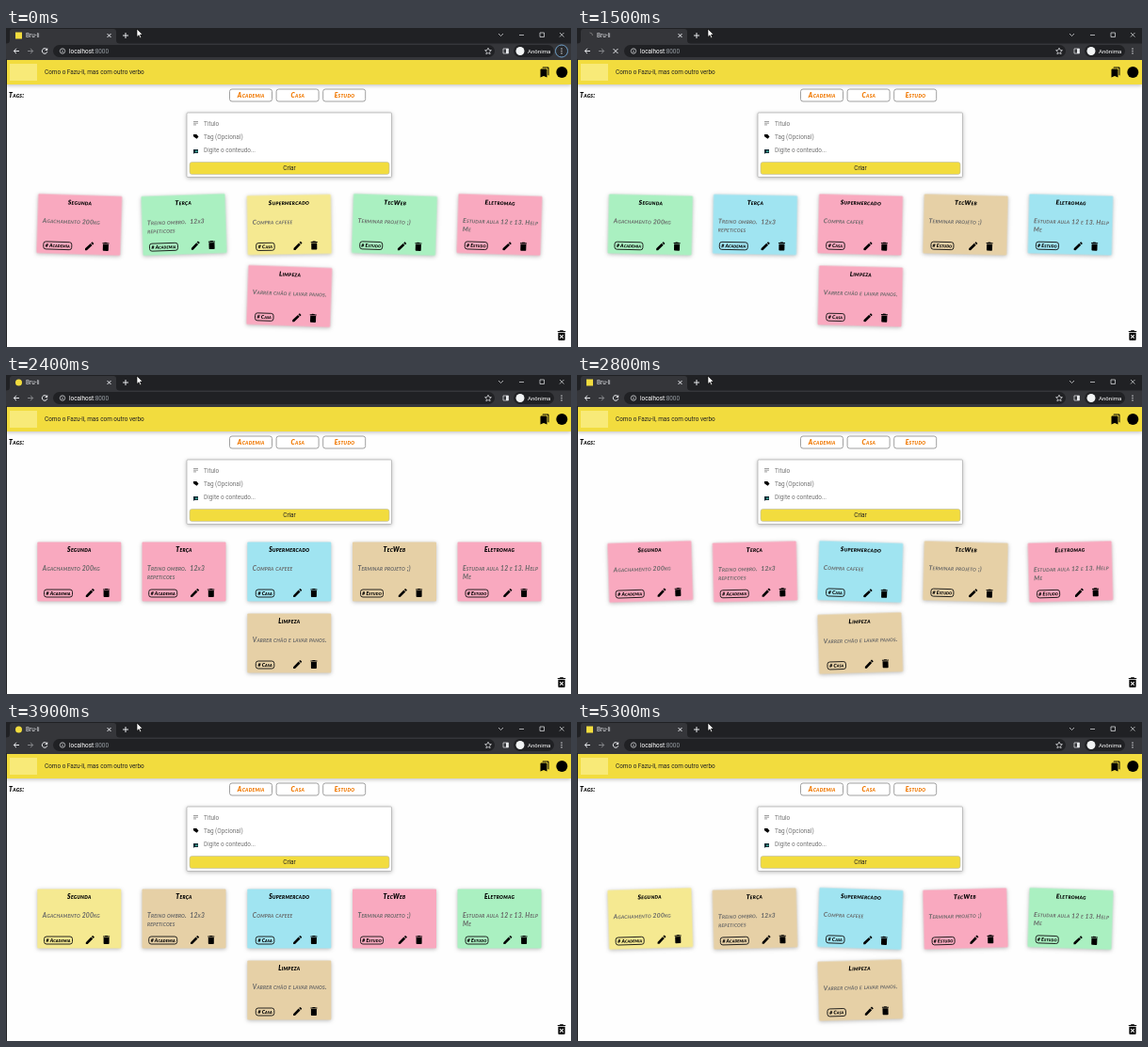
An HTML page that plays this animation: 600x339 px, repeating every 5.4 s.

```html
<!DOCTYPE html>
<html lang="pt">
<head>
<meta charset="utf-8">
<style>
  html, body { margin: 0; width: 100%; height: 100%; overflow: hidden; background: #fefefe; }
  svg { display: block; }
  text { font: 6.4px Roboto, sans-serif; white-space: pre; }
  .hand text, text.hand { font: italic 700 6.8px Lato, sans-serif; font-variant: small-caps; letter-spacing: .2px; }
  .hand text.bold, text.hand { font-weight: 900; letter-spacing: .3px; }
  .hand text.tag { font-size: 5.2px; font-weight: 900; letter-spacing: .1px; }
  .mid { text-anchor: middle; }
  .line { fill: none; stroke: #e8eaed; stroke-width: 1; }
  .soft { filter: drop-shadow(0 1px 2px #0004); }
</style>
</head>
<body>
<svg width="600" height="339" viewBox="0 0 600 339">
  <defs>
    <path id="pencil" d="M3 17.25V21h3.75L17.81 9.94l-3.75-3.75zM20.71 7.04a1 1 0 0 0 0-1.41l-2.34-2.34a1 1 0 0 0-1.41 0l-1.83 1.83 3.75 3.75z"/>
    <path id="bin" d="M6 19c0 1.1.9 2 2 2h8c1.1 0 2-.9 2-2V7H6zM19 4h-3.5l-1-1h-5l-1 1H5v2h14z"/>
  </defs>

  <!-- Header -->
  <rect class="soft" y="33" width="600" height="27" fill="#f2dc3e"/>
  <rect x="4" y="38" width="29" height="18" fill="#f8ea78"/>
  <text x="41" y="49" fill="#222">Como o Fazu-li, mas com outro verbo</text>
  <path transform="translate(566 41) scale(.5)" d="M19 18l2 1V3c0-1.1-.9-2-2-2H9C7.9 1 7 1.900 7 3h10c1.1 0 2 .9 2 2zM15 5H5c-1.1 0-2 .9-2 2v16l7-3 7 3V7c0-1.1-.9-2-2-2z"/>
  <circle cx="590.3" cy="47" r="6"/>

  <!-- Browser -->
  <rect width="600" height="17" fill="#202124"/>
  <path d="M0 16.5Q4 16.5 4 13V4Q4 1 7 1H114Q117 1 117 4V13Q117 16.5 121 16.5H600V34H0z" fill="#35363a"/>
  <rect y="33" width="1" height="306" fill="#202124"/>
  <rect id="icon" x="10" y="4.5" width="7" height="7" fill="#f2dc3e"/>
  <path id="spinner" class="line" d="M13.5 5A3 3 0 0 1 16.5 8" style="stroke:#777"/>
  <text x="21" y="10.300" fill="#dfe1e5">Bru-li</text>
  <path class="line" d="M107.5 6l4 4m0-4l-4 4M124 8h6m-3-3v6"/>
  <path class="line" d="M523 6l2.5 2.5L528 6M545 7.5h5M567 5h4.5v4.5H567zM588 5l4.5 4.5m0-4.5L588 9.5" style="stroke-width:.7"/>
  <path d="M139 1v8.5l2-1.8 1.5 3 1.3-.6-1.4-3h2.7z" fill="#fff" stroke="#000" stroke-width=".6"/>
  <rect x="50" y="18" width="469" height="13" rx="6.5" fill="#202124"/>
  <path class="line" d="M14 24.500H8.5m2.5-2.7L8.3 24.500 11 27.2"/>
  <path class="line" d="M23 24.500h5.5m-2.5-2.7L28.7 24.500 26 27.2" style="stroke:#85878a"/>
  <g id="reload"><path class="line" d="M43.3 22.7A2.8 2.8 0 1 0 43.8 25.2"/><path d="M44.2 21v3h-3z" fill="#e8eaed"/></g>
  <path id="stop" class="line" d="M38.5 22l5 5m0-5l-5 5"/>
  <g class="line" style="stroke-width:.7"><circle cx="60" cy="24.5" r="2.7"/><path d="M60 24v2M60 22.8v.6"/>
    <path d="M512 21.2l1 2.2 2.4.3-1.8 1.6.5 2.4-2.1-1.2-2.1 1.2.5-2.4-1.8-1.6 2.4-.3z"/>
    <path d="M528 22h5.5v5H528z"/></g>
  <path d="M531 22h2.5v5H531z" fill="#e8eaed"/>
  <text x="67" y="27" fill="#fff">localhost<tspan fill="#9aa0a6">:8000</tspan></text>
  <rect x="539" y="18" width="43" height="13" rx="6.5" fill="#202124"/>
  <circle cx="546" cy="24.5" r="4.5" fill="#f1f3f4"/>
  <text x="554" y="26.7" fill="#fff" style="font-size:6.1px">Anônima</text>
  <circle id="ring" cx="590" cy="24.5" r="6.5" fill="#292a2d" stroke="#6f9fc8"/>
  <path d="M590 21.5v1.2m0 1.2v1.2m0 1.2v1.2" stroke="#e8eaed" stroke-width="1.2"/>

  <text class="hand" x="3" y="74">Tags:</text>
  <g id="filters"></g>

  <!-- Form -->
  <rect x="192" y="90" width="217.5" height="68.5" rx="1" fill="#fff" stroke="#aaa" stroke-width=".7" class="soft"/>
  <path d="M199 99.5h5m-5 1.7h5m-5 1.7h3" stroke="#777" stroke-width=".7"/>
  <path d="M199 113h3.3l2.2 2.5-2 2.2-3.5-2.5z"/>
  <path d="M199 129h5v4h-4l-1 1z" fill="#152c35"/><path d="M201 130.500h2.5v1.5H201z" fill="#39a596"/>
  <g fill="#757575">
    <text x="210" y="103.8">Título</text>
    <text x="210" y="117.8">Tag (Opcional)</text>
    <text x="210" y="131.8">Digite o conteudo...</text>
  </g>
  <rect x="195" y="142.5" width="212" height="13" rx="2.5" fill="#f2dc3e" stroke="#bba" stroke-width=".6"/>
  <text class="mid" x="301" y="151.300" fill="#222">Criar</text>

  <g id="cards"></g>
  <g transform="translate(582.8 319.5) scale(.6)"><use href="#bin"/><path d="M9 11l6 6m0-6l-6 6" stroke="#fff" stroke-width="1.8"/></g>
</svg>
<script>
const $ = id => document.getElementById(id);
const LOOP = 5400, STEP = 100, SETTLE = 300, PENDING = 350;
const palette = { p: '#f9a9bf', g: '#aaf0c1', y: '#f5e991', b: '#a0e4f1', t: '#e6d0a6' };

const notes = [
  [77.8, 209, 'Segunda', ['Agachamento 200kg'], 'Academia'],
  [189, 209, 'Terça', ['Treino ombro.  12x3', 'repeticoes'], 'Academia'],
  [300.8, 209, 'Supermercado', ['Compra cafeee'], 'Casa'],
  [412.5, 209, 'TecWeb', ['Terminar projeto ;)'], 'Estudo'],
  [524, 209, 'Eletromag', ['Estudar aula 12 e 13. Help', 'Me'], 'Estudo'],
  [300.8, 285, 'Limpeza', ['Varrer chão e lavar panos.'], 'Casa']
];
// Tag box: left edge, width, and left shift of the icons beside it.
const tagBox = { Academia: [-37.3, 30, 0], Casa: [-35.5, 19.5, 2.7], Estudo: [-36, 24, 2.7] };

// Each page load picks new colours and tilts (degrees).
const loads = [
  { at: -SETTLE, colors: 'pgygpp', tilts: [1.8, -1.9, -.9, 1.9, 1.8, 2] },
  { at: 700, colors: 'pbytby', tilts: [1, -1, 1, 1, -1, 1] },
  { at: 1200, colors: 'gbptbp', tilts: [1.3, 1, 1.5, 1.4, 1.4, 1.4] },
  { at: 1800, colors: 'gpybgt', tilts: [1.3, 1.1, .8, 1.2, 1.4, 1.1] },
  { at: 2400, colors: 'ppbtpt', tilts: [-1.8, -1.3, 1.8, 1.5, -1.5, -1.7] },
  { at: 3900, colors: 'ytbpgt', tilts: [-1.7, -1.5, 2, -1.5, 1.9, -1.6] }
];

$('filters').innerHTML = ['Academia', 'Casa', 'Estudo'].map((name, i) => {
  const x = 237.5 + i * 49.6;
  return `<rect x="${x}" y="65" width="45" height="13" rx="2.5" fill="#fff" stroke="#888" stroke-width=".8"/>
    <text class="hand mid" x="${x + 22.8}" y="74" fill="#f07800">${name}</text>`;
}).join('');

$('cards').innerHTML = notes.map(([, , title, lines, tag]) => {
  const [x, w, shift] = tagBox[tag];
  return `<g class="hand">
    <rect class="soft" x="-44.5" y="-31.5" width="89" height="63" rx="1"/>
    <text class="mid bold" y="-21">${title}</text>
    ${lines.map((s, i) => `<text x="-39" y="${-.8 + i * 9}" fill="#666">${s}</text>`).join('')}
    <rect x="${x}" y="19" width="${w}" height="8" rx="2.5" fill="none" stroke="#111" stroke-width=".9"/>
    <text class="mid tag" x="${x + w / 2}" y="24.8"># ${tag}</text>
    <use href="#pencil" transform="translate(${5.5 - shift} 16.5) scale(.5)"/>
    <use href="#bin" transform="translate(${22.8 - shift} 16.5) scale(.5)"/>
  </g>`;
}).join('');

const cards = [...$('cards').children];
const show = (id, on) => $(id).setAttribute('visibility', on ? 'visible' : 'hidden');

function draw(now) {
  const t = Math.floor(now % LOOP / STEP) * STEP;
  const page = loads.filter(l => l.at <= t).pop();
  const age = t - page.at;
  const k = 1 - (1 - Math.min(1, age / SETTLE)) ** 2;
  cards.forEach((card, i) => {
    const [x, y] = notes[i];
    card.setAttribute('transform', `translate(${x} ${y}) rotate(${page.tilts[i] * k})`);
    card.firstElementChild.setAttribute('fill', palette[page.colors[i]]);
  });
  const pending = loads.some(l => l.at > t && l.at - t < PENDING);
  show('reload', !pending);
  show('stop', pending);
  show('icon', !pending);
  show('spinner', pending);
  show('ring', page === loads[0]);
  $('icon').setAttribute('rx', age < 200 ? 3.5 : 0);
}

const start = performance.now();
function tick(now) {
  draw(Math.max(0, now - start));
  requestAnimationFrame(tick);
}
requestAnimationFrame(tick);
</script>
</body>
</html>
```
